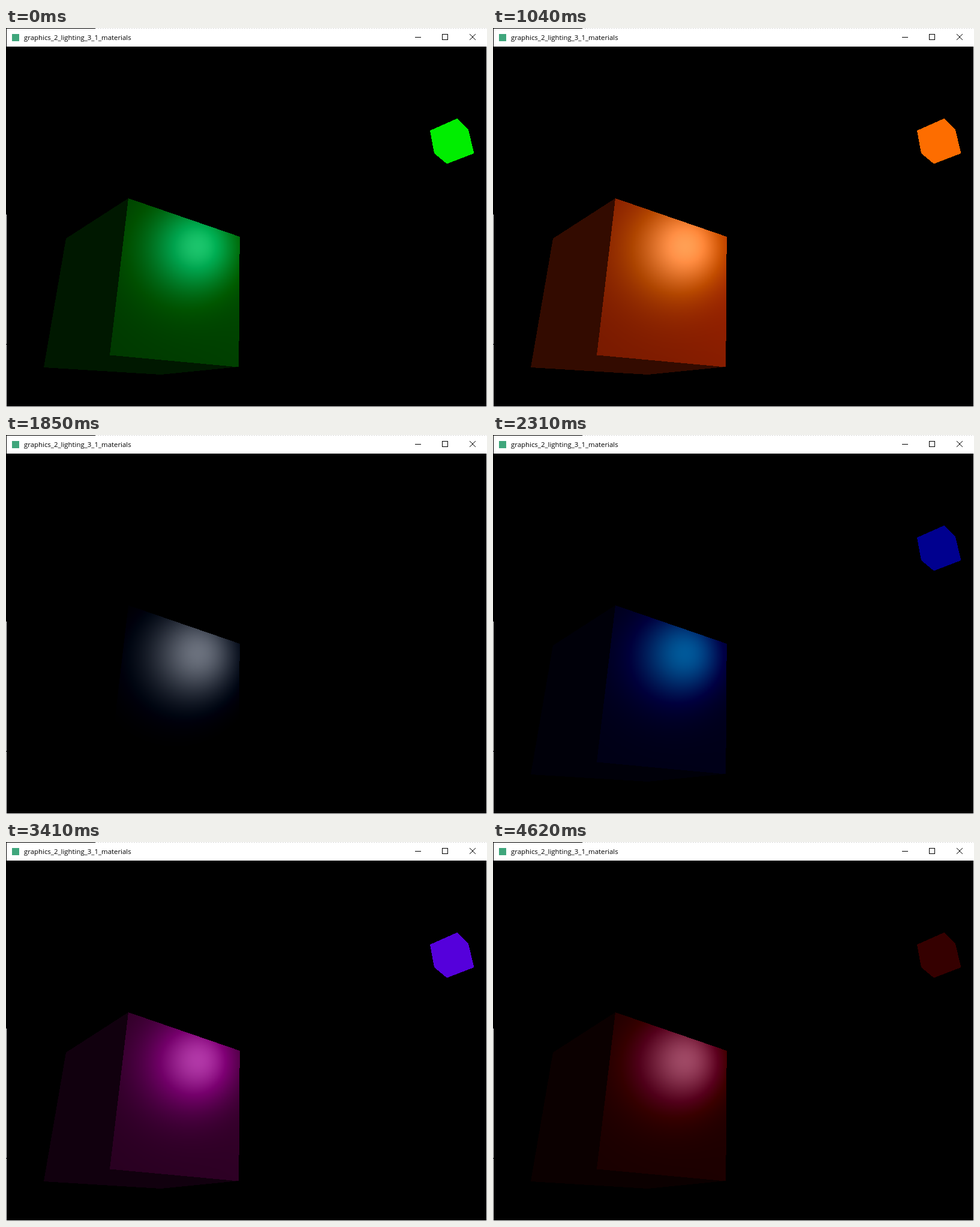
These frames come from a looping animation (802 px wide and 632 px high, 4.68 s). An HTML page with a canvas:

```html
<!DOCTYPE html>
<html>
<head>
<meta charset="utf-8">
<style>
html, body { margin: 0; width: 100%; height: 100%; overflow: hidden; background: #000; }
svg, canvas { position: absolute; left: 0; top: 0; display: block; }
text { font: 11.42px "Open Sans", "Noto Sans", sans-serif; }
</style>
</head>
<body>
<svg width="802" height="632" viewBox="0 0 802 632" shape-rendering="crispEdges">
  <rect width="802" height="632" fill="#000"/>
  <rect x="1" y="1" width="801" height="30" fill="#fff"/>
  <path d="M149 .5H802" stroke="#fff"/>
  <path d="M149 .5H802" stroke="#d8d8d8" stroke-dasharray="2 2"/>
  <path d="M.5 311V527M.5 528V632M0 631.5H802M801.5 31V632" stroke="#f0f0f0" fill="none"/>
  <rect x="10" y="10" width="12" height="12" fill="#3fa67c"/>
  <text x="30" y="20" fill="#000">graphics_2_lighting_3_1_materials</text>
  <path d="M682 15.5H692M727.5 10.5H736.5V19.5H727.5Z" stroke="#000" fill="none"/>
  <path d="M773 10L783 20M783 10L773 20" stroke="#000" fill="none" shape-rendering="auto"/>
  <polygon id="sides" points="204,284 100,351 63,566 258,578 388,565 300,450"/>
  <polygon id="lamp" points="752,151 771,170 780.5,209 735,226.5 714,209 707,171"/>
</svg>
<canvas id="face"></canvas>
<script>
const LOOP = 4680;
const MATERIAL = [1, 0.5, 0.31];
const RATES = [2, 0.7, 1.3];
const AMBIENT = 0.2, DIFFUSE = 0.5, SPECULAR = 0.5, SHINE = 32;

// Scene: unit cube at the origin, point light, camera looking up to the right
const LIGHT = [1.2, 1, 2];
const EYE = [-1.698, -0.785, 2.908];
const YAW = 46.65 * Math.PI / 180, PITCH = 22.9 * Math.PI / 180, FOCAL = 724;
const CENTER = [401, 331];

// Corners of the lit face, clockwise on screen
const CORNERS = [[204, 284], [389.7, 348], [388.2, 565.5], [173, 545.5]];
const LEFT = 173, TOP = 284, W = 217, H = 282;

// Runs of evenly spaced redraws: first, last, count
const RUNS = [
  [0, 0, 1], [50, 560, 12], [600, 1100, 11], [1170, 1660, 9], [1720, 2190, 8],
  [2250, 2310, 2], [2380, 2730, 6], [2800, 3080, 5], [3160, 3280, 3],
  [3340, 3840, 9], [3910, 4430, 9], [4490, 4620, 3]
];
const ticks = RUNS.flatMap(([a, b, n]) => Array.from({ length: n },
  (_, i) => Math.round((a + (b - a) * i / Math.max(1, n - 1)) / 10) * 10));

// Loop time in ms to scene clock in seconds
const CLOCK = [[0, 2.765], [510, 3.327], [1600, 4.51], [2310, 5.29],
  [3080, 6.11], [3910, 7], [4620, 7.749]];

const sides = document.getElementById("sides");
const lamp = document.getElementById("lamp");
const face = document.getElementById("face");
face.width = W;
face.height = H;
face.style.left = LEFT + "px";
face.style.top = TOP + "px";
const ctx = face.getContext("2d");
const image = ctx.createImageData(W, H);

const dot = (a, b) => a[0] * b[0] + a[1] * b[1] + a[2] * b[2];
const sub = (a, b) => a.map((v, i) => v - b[i]);
const unit = a => a.map(v => v / Math.hypot(...a));

function inFace(x, y) {
  return CORNERS.every(([ax, ay], i) => {
    const [bx, by] = CORNERS[(i + 1) % 4];
    return (bx - ax) * (y - ay) - (by - ay) * (x - ax) >= 0;
  });
}

// Where the view ray through a pixel meets the plane z = 0.5
function hit(x, y) {
  const u = (x - CENTER[0]) / FOCAL, v = (CENTER[1] - y) / FOCAL;
  const ahead = Math.cos(PITCH) - v * Math.sin(PITCH);
  const rise = Math.sin(PITCH) + v * Math.cos(PITCH);
  const dir = [
    u * Math.sin(YAW) + ahead * Math.cos(YAW),
    rise,
    u * Math.cos(YAW) - ahead * Math.sin(YAW)
  ];
  const k = (0.5 - EYE[2]) / dir[2];
  return EYE.map((e, i) => e + k * dir[i]);
}

const pixels = [];
for (let j = 0; j < H; j++) {
  for (let i = 0; i < W; i++) {
    const x = LEFT + i + 0.5, y = TOP + j + 0.5;
    if (!inFace(x, y)) continue;
    const p = hit(x, y);
    const toLight = unit(sub(LIGHT, p)), toEye = unit(sub(EYE, p));
    const mirror = [-toLight[0], -toLight[1], toLight[2]];
    const at = (j * W + i) * 4;
    pixels.push({
      at,
      body: AMBIENT + DIFFUSE * toLight[2],
      gloss: 255 * SPECULAR * Math.max(0, dot(toEye, mirror)) ** SHINE
    });
    image.data[at + 3] = 255;
  }
}

function clockAt(t) {
  let i = 0;
  while (i < CLOCK.length - 2 && t > CLOCK[i + 1][0]) i++;
  const [t0, c0] = CLOCK[i], [t1, c1] = CLOCK[i + 1];
  return c0 + (c1 - c0) * (t - t0) / (t1 - t0);
}

const css = rgb => `rgb(${rgb.map(v => Math.round(Math.min(255, Math.max(0, v)))).join(",")})`;

function draw(t) {
  const clock = clockAt(t);
  const light = RATES.map(r => 255 * Math.sin(r * clock));
  const tint = light.map((v, i) => v * MATERIAL[i]);
  lamp.setAttribute("fill", css(light));
  sides.setAttribute("fill", css(tint.map(v => v * AMBIENT)));
  for (const { at, body, gloss } of pixels) {
    for (let c = 0; c < 3; c++) image.data[at + c] = tint[c] * body + gloss;
  }
  ctx.putImageData(image, 0, 0);
}

let shown = -1;
const start = performance.now();
function loop() {
  const t = Math.max(0, performance.now() - start) % LOOP;
  const tick = ticks.filter(v => v <= t).pop();
  if (tick !== shown) draw(shown = tick);
  requestAnimationFrame(loop);
}
loop();
</script>
</body>
</html>
```
